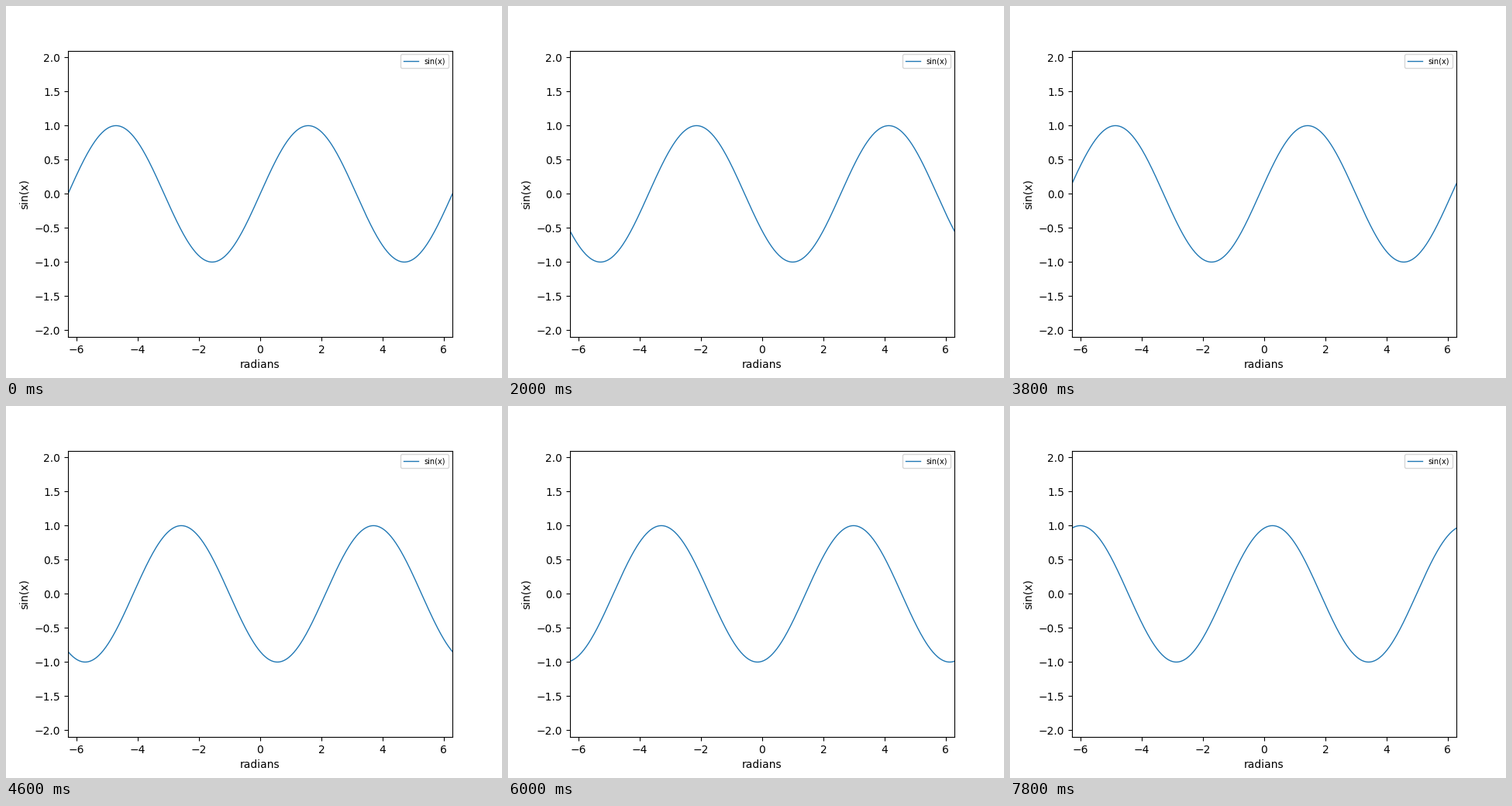
A matplotlib script that plays this animation: 640x480 px, repeating every 8 s.

```python
import matplotlib.pyplot as plt
import numpy as np
from matplotlib.animation import FuncAnimation

FRAMES = 40
INTERVAL = 200  # ms

fig, ax = plt.subplots(figsize=(6.4, 4.8), dpi=100)

x = np.linspace(-2 * np.pi, 2 * np.pi, 500)
line, = ax.plot(x, np.sin(x), color="#1f77b4", linewidth=1, label="sin(x)")

ax.set_xlim(-2 * np.pi, 2 * np.pi)
ax.set_ylim(-2.1, 2.1)
ax.set_xlabel("radians")
ax.set_ylabel("sin(x)")
ax.legend(loc="upper right", fontsize=7)


def update(i):
    # The wave moves left by one radian per step.
    line.set_ydata(np.sin(x + i))
    return line,


anim = FuncAnimation(fig, update, frames=FRAMES, interval=INTERVAL,
                     repeat=True, repeat_delay=0)
plt.show()
```
